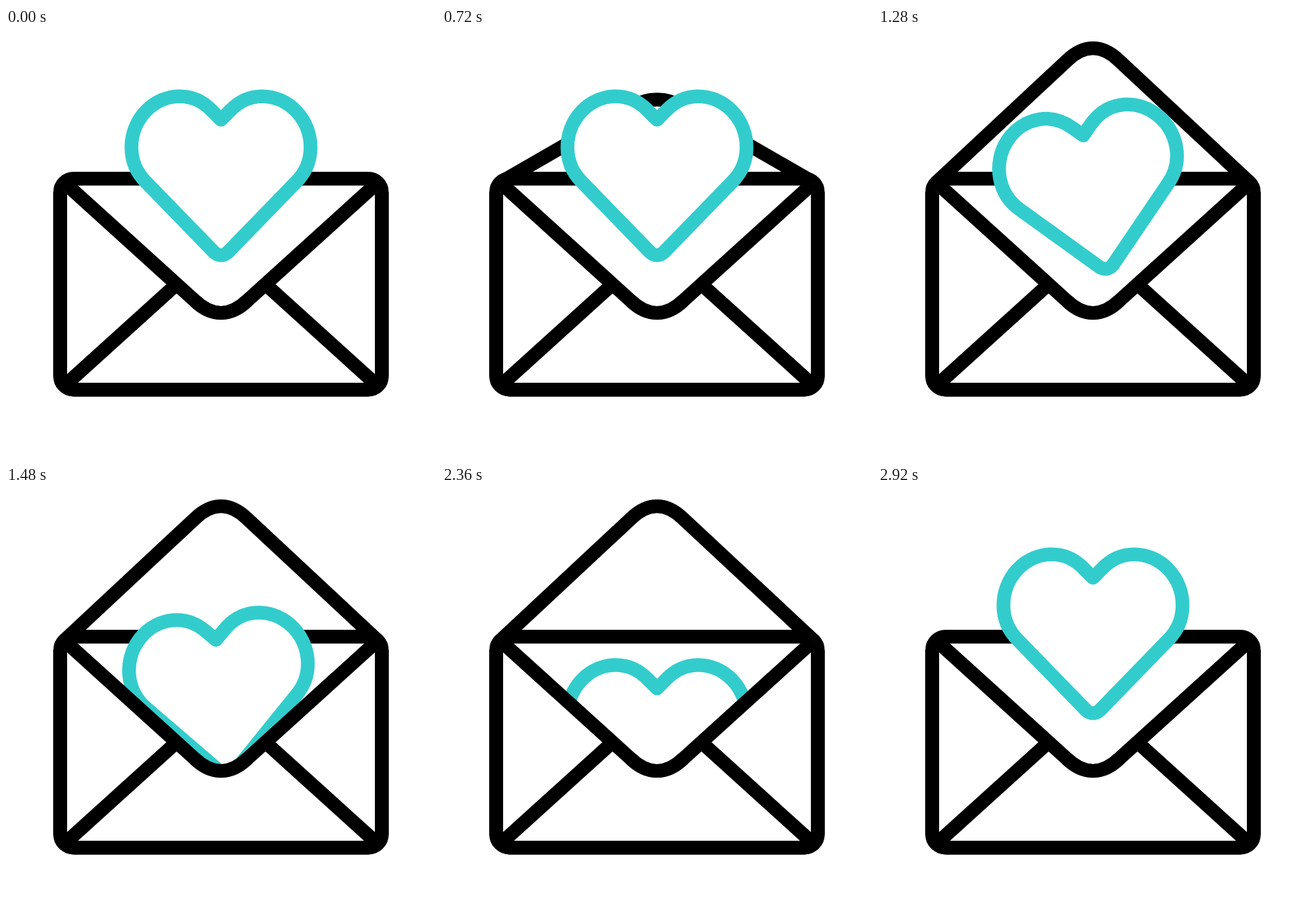
An HTML page that plays this animation: 640x640 px, repeating every 3 s.

```html
<!DOCTYPE html>
<html lang="en">
<head>
<meta charset="utf-8">
<title>Love letter</title>
<style>
  html, body { margin: 0; width: 100%; height: 100%; overflow: hidden; background: #fff; }
  svg { display: block; width: 100%; height: 100%; }
</style>
</head>
<body>
<svg viewBox="0 0 640 640" fill="none" stroke="#000" stroke-width="20.5" stroke-linejoin="round">
  <rect x="80.7" y="224.2" width="478.6" height="314" rx="20"/>
  <path id="flap"/>
  <path id="heart" fill="#fff" stroke="#33cccc" d="M320 136.6L306.5 123Q286 101.7 259 101.7
    A72.3 76.3 0 0 0 186.7 178A73 73 0 0 0 208 229L310 334Q320 342.5 330 334
    L432 229A73 73 0 0 0 453.3 178A72.3 76.3 0 0 0 381 101.7Q354 101.7 333.5 123Z"/>
  <path id="pocket" fill="#fff" stroke="none"/>
  <path id="fold"/>
  <path d="M86.7 532.7L251 384M553.3 532.7L389 384"/>
  <path d="M80.7 244.2V518.2a20 20 0 0 0 20 20H539.3a20 20 0 0 0 20 -20V244.2"/>
</svg>
<script>
const LOOP = 3000, STEP = 40;
const $ = id => document.getElementById(id);

// Rounded triangle on the top corners: 1 points down, -1 points up.
function flapPath(k) {
  const shoulder = 230 + 176 * k, tip = 230 + 200 * k;
  return `M86.7 230L281 ${shoulder}C306 ${tip} 334 ${tip} 359 ${shoulder}L553.3 230`;
}

function draw(now) {
  const t = Math.floor(now % LOOP / STEP) * STEP;
  // Eased progress from 0 to 1 between two times.
  const ease = (from, to) => {
    const x = Math.min(1, Math.max(0, (t - from) / (to - from)));
    return x * x * (3 - 2 * x);
  };

  const open = ease(160, 940) - ease(2520, 2920);
  const hop = ease(720, 1000) - ease(1000, 1840);
  const sink = ease(1000, 1840) - ease(2320, 2655);
  const tilt = ease(720, 1180) - ease(1180, 1760);
  const squeeze = ease(1640, 1800) - ease(1840, 2000);

  const y = 220 - 30.4 * hop + 171.5 * sink + 3.5 * squeeze;
  $('flap').setAttribute('d', flapPath(1 - 2.03 * open));
  $('heart').setAttribute('transform',
    `translate(320 ${y}) rotate(${-10.9 * tilt}) scale(${1 - 0.033 * squeeze}) translate(-320 -220)`);
}

$('fold').setAttribute('d', flapPath(1));
$('pocket').setAttribute('d', flapPath(1) + 'V538H86.7Z');

let start;
function tick(now) {
  start ??= now;
  draw(now - start);
  requestAnimationFrame(tick);
}
draw(0);
requestAnimationFrame(tick);
</script>
</body>
</html>
```
